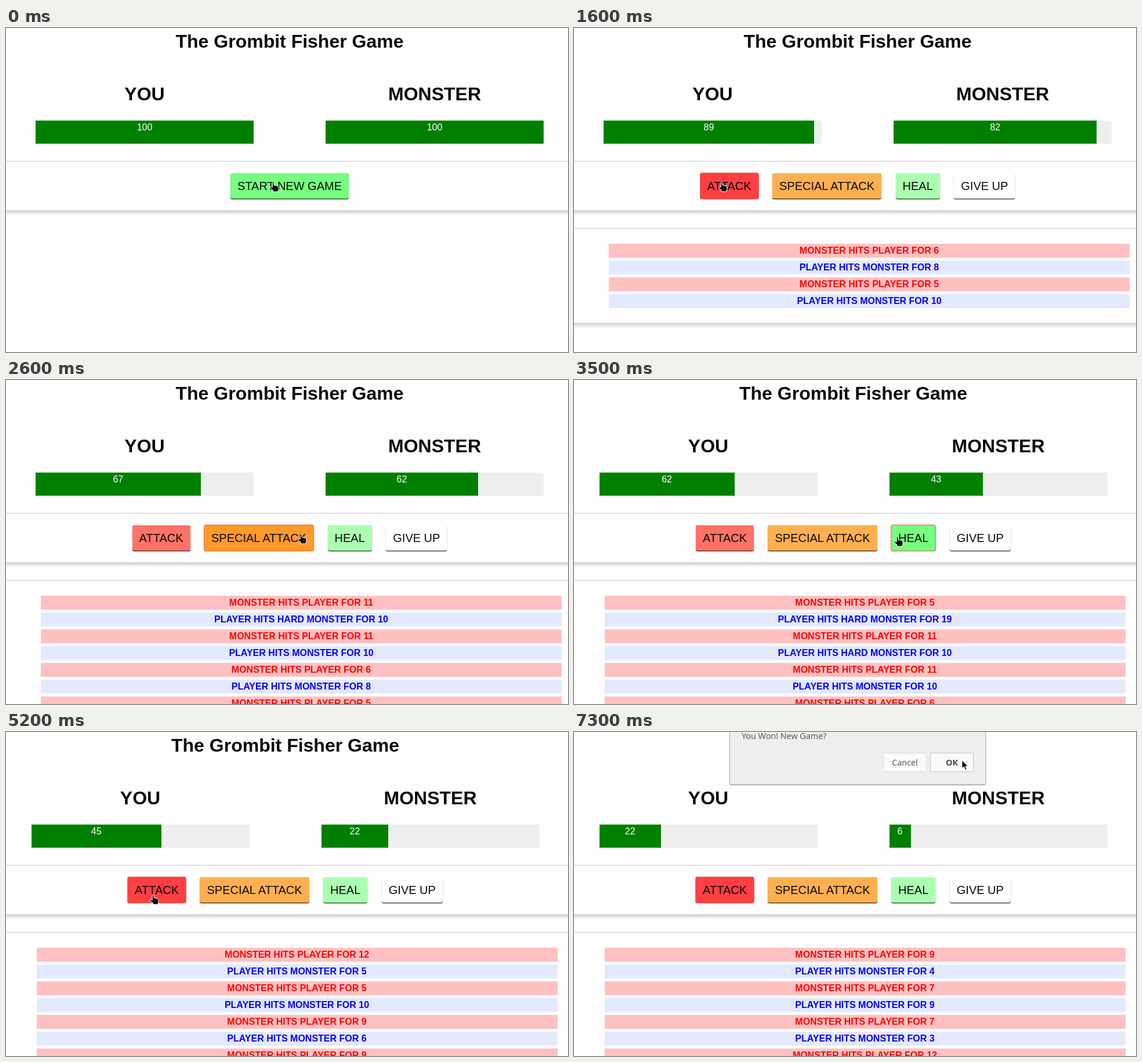
Animation, 969 px wide and 560 px high, one loop 8000 ms. Source, as an HTML page:

```html
<!DOCTYPE html>
<html lang="en">
<head>
<meta charset="utf-8">
<title>Battle game</title>
<style>
  html, body { margin: 0; width: 100%; height: 100%; overflow: hidden; background: #fefefe; }
  body { position: relative; color: #0a0a0a; font: 16px/24px "Liberation Sans", Arial, sans-serif; }
  #page { position: absolute; top: 0; width: 978px; height: 560px; }
  h1 { position: absolute; margin: 0; font-size: 32px; line-height: 36px; text-align: center; white-space: nowrap; }
  .bar { position: absolute; top: 160px; width: 376px; height: 40px; background: #eee; }
  .bar div { height: 40px; background: green; color: #fff; text-align: center; }
  .panel { position: absolute; left: -30px; width: 1100px; box-sizing: border-box;
    border: 1px solid #ccc; box-shadow: 0 3px 6px #ccc; }
  .buttons { position: absolute; top: 241px; width: 978px; text-align: center; white-space: nowrap; }
  .buttons span { display: inline-block; vertical-align: top; margin: 10px; padding: 12px;
    font-size: 20px; line-height: 20px; border-radius: 3px; box-shadow: 0 1px 1px #000; }
  .buttons .ring { box-shadow: 0 0 0 1px #e5694f, 0 1px 1px #000; }
  #start, #heal { background: #aaffb0; }
  #start.hover, #heal.hover { background: #76ff7e; }
  #attack { background: #ff7367; }
  #attack.hover { background: #ff3f43; }
  #special { background: #ffaf4f; }
  #special.hover { background: #ff9a2b; }
  #quit { background: #fff; }
  #rows { position: absolute; left: 60px; top: 373px; width: 898px; }
  #rows div { height: 24px; margin-bottom: 5px; text-align: center; font-weight: bold; }
  .monster { background: #ffc0c1; color: red; }
  .player { background: #e4e8ff; color: blue; }
  #dialog { position: absolute; left: 268px; top: -40px; width: 440px; height: 129px;
    border: 1px solid #b4b4b4; border-radius: 0 0 3px 3px; background: #eee;
    box-shadow: 0 1px 2px rgba(0,0,0,.35); color: #4c4c4c;
    font: 14.4px/20px "Open Sans", "Noto Sans", sans-serif; }
  #dialog p { position: absolute; left: 20px; top: 36px; margin: 0; white-space: nowrap; }
  #dialog b, #dialog i { position: absolute; top: 75px; width: 73px; height: 31px; line-height: 32px;
    text-align: center; font-style: normal; background: #fafafa; border: 1px solid #dcdcdc; border-radius: 2px; }
  #dialog i { left: 264px; }
  #dialog b { left: 345px; border-color: #c4c4c4; }
  svg { position: absolute; left: 0; top: 0; overflow: visible; }
  svg path { fill: #0c0c0c; stroke: #fff; stroke-width: 1; stroke-linejoin: round; }
</style>
</head>
<body>
<div id="page">
  <h1 style="left:0;top:5px;width:978px">The Grombit Fisher Game</h1>
  <h1 style="left:51px;top:96px;width:376px">YOU</h1>
  <h1 style="left:551px;top:96px;width:376px">MONSTER</h1>
  <div class="bar" style="left:51px"><div id="you"></div></div>
  <div class="bar" style="left:551px"><div id="foe"></div></div>
  <div class="panel" style="top:230px;height:86px"></div>
  <div class="buttons" id="intro"><span id="start">START NEW GAME</span></div>
  <div class="buttons" id="moves">
    <span id="attack">ATTACK</span>
    <span id="special">SPECIAL ATTACK</span>
    <span id="heal">HEAL</span>
    <span id="quit">GIVE UP</span>
  </div>
  <div class="panel" id="log" style="top:346px"></div>
  <div id="rows"></div>
</div>
<div id="dialog"><p>You Won! New Game?</p><i>Cancel</i><b>OK</b></div>
<svg width="20" height="20">
  <path id="hand" d="M4.2 2Q4.2.5 5.6.5T7 2V5.6L12.6 6.7Q15 7.2 15 9.4V12.6L13.6 17H5.2V14.6L1 10.8Q.2 9.2 1.6 8.4 2.8 8 4.2 9.4Z"/>
  <path id="arrow" d="M.5 .5V14.6L3.8 11.6 6.2 17 8.6 16 6.3 10.8H10.8Z"/>
</svg>
<script>
const LOOP = 8000, FADE = 500, FROZEN = 5895, START = 300, SCROLLBAR = 2715;
const $ = id => document.getElementById(id);

// time, damage to player, damage to monster, move
const turns = [
  [1395, 5, 10, 'hit'], [1595, 6, 8, 'hit'], [1795, 11, 10, 'hit'],
  [2520, 11, 10, 'hard'], [SCROLLBAR, 5, 19, 'hard'],
  [3560, 5, 0, 'heal'], [3740, 7, 0, 'heal'], [3920, 9, 0, 'heal'],
  [4835, 9, 6, 'hit'], [4990, 5, 10, 'hit'], [5195, 12, 5, 'hit'],
  [5380, 7, 3, 'hit'], [5560, 7, 9, 'hit'], [5740, 9, 4, 'hit']
];
const hovers = [[0, 'start'], [START, ''], [1395, 'attack'], [2495, 'special'], [3495, 'heal'],
  [3940, ''], [3980, 'special'], [4165, ''], [4190, 'attack']];
const rings = [[0, ''], [195, 'start'], [START, ''], [1395, 'attack'], [2495, 'special'],
  [3495, 'heal'], [4795, 'attack']];
// time, x, y of the pointer; equal times make a jump
const path = [[0, 455, 266], [600, 455, 266], [1000, 249, 266], [2495, 249, 266], [2495, 503, 266],
  [3495, 503, 266], [3495, 552, 270.5], [3900, 552, 270.5], [4300, 249, 277], [4400, 248, 281],
  [6700, 248, 281], [7300, 668.5, 48.5], [LOOP, 668.5, 48.5]];

const clamp = v => Math.min(1, Math.max(0, v));
const smooth = p => p * p * (3 - 2 * p);
const current = (list, t) => list.filter(e => e[0] <= t).pop()[1];

// cubic-bezier(.25, .1, .25, 1)
function ease(x) {
  if (x <= 0 || x >= 1) return clamp(x);
  const curve = (a, b, s) => 3 * a * s * (1 - s) ** 2 + 3 * b * s * s * (1 - s) + s ** 3;
  let lo = 0, hi = 1;
  for (let i = 0; i < 24; i++) {
    const mid = (lo + hi) / 2;
    if (curve(.25, .25, mid) < x) lo = mid; else hi = mid;
  }
  return curve(.1, 1, lo);
}

// Health value plus the width that trails behind it
function health(t, loss) {
  let from = 100, to = 100, since = -FADE;
  const width = now => from + (to - from) * ease((now - since) / FADE);
  for (const turn of turns) {
    if (turn[0] > t) break;
    from = width(turn[0]);
    to -= loss(turn);
    since = turn[0];
  }
  return { value: to, width: width(Math.min(t, FROZEN)) };
}

function showBar(id, h) {
  $(id).style.width = h.width + '%';
  $(id).textContent = h.value;
}

function entry([, hurt, dealt, move]) {
  const text = {
    hit: `PLAYER HITS MONSTER FOR ${dealt}`,
    hard: `PLAYER HITS HARD MONSTER FOR ${dealt}`,
    heal: 'PLAYER HEALS FOR 10'
  }[move];
  return `<div class="monster">MONSTER HITS PLAYER FOR ${hurt}</div><div class="player">${text}</div>`;
}

let shown = -1;
function showLog(t) {
  const done = turns.filter(e => e[0] <= t);
  if (done.length === shown) return;
  shown = done.length;
  $('rows').innerHTML = done.reverse().map(entry).join('');
  $('log').style.display = shown ? 'block' : 'none';
  $('log').style.height = 49 + 58 * shown + 'px';
}

function showButtons(t) {
  $('intro').style.display = t < START ? 'block' : 'none';
  $('moves').style.display = t < START ? 'none' : 'block';
  const hover = current(hovers, t), ring = current(rings, t);
  for (const id of ['start', 'attack', 'special', 'heal', 'quit']) {
    $(id).classList.toggle('hover', id === hover);
    $(id).classList.toggle('ring', id === ring);
  }
}

function showPointer(t) {
  let i = 0;
  while (i < path.length - 2 && path[i + 1][0] <= t) i++;
  const [t0, x0, y0] = path[i], [t1, x1, y1] = path[i + 1];
  const p = smooth(clamp((t - t0) / (t1 - t0)));
  const at = `translate(${x0 + (x1 - x0) * p} ${y0 + (y1 - y0) * p})`;
  const arrow = t > 6700;
  for (const id of ['hand', 'arrow']) {
    $(id).setAttribute('transform', at);
    $(id).style.display = (id === 'arrow') === arrow ? 'inline' : 'none';
  }
}

function showDialog(t) {
  const p = clamp((t - FROZEN) / 305);
  $('dialog').style.display = p ? 'block' : 'none';
  $('dialog').style.opacity = p;
  $('dialog').style.transform = `translateY(${-17 * (1 - p)}px)`;
}

function draw(t) {
  $('page').style.left = (t < SCROLLBAR ? 0 : -7.5) + 'px';
  showBar('you', health(t, e => e[1] - (e[3] === 'heal' ? 10 : 0)));
  showBar('foe', health(t, e => e[2]));
  showButtons(t);
  showLog(t);
  showDialog(t);
  showPointer(t);
}

const begin = performance.now();
function tick() {
  draw((performance.now() - begin) % LOOP);
  requestAnimationFrame(tick);
}
tick();
</script>
</body>
</html>
```
